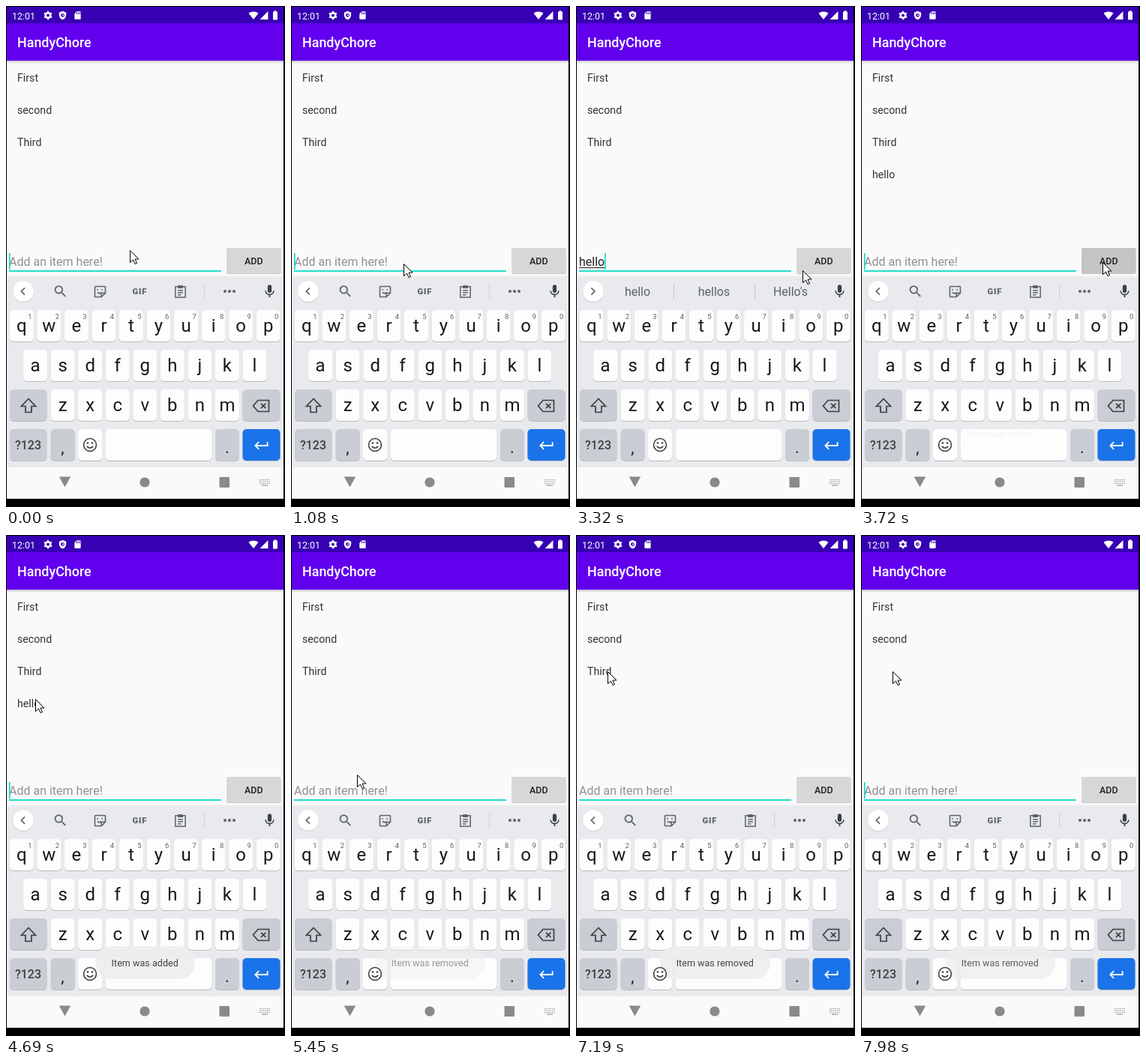
An HTML page with a canvas that plays this animation: 372x669 px, repeating every 8000 ms.

```html
<!DOCTYPE html>
<html lang="en">
<head>
<meta charset="utf-8">
<title>To-do list</title>
<style>
html, body { margin: 0; width: 100%; height: 100%; overflow: hidden; background: #000; }
canvas { display: block; }
</style>
</head>
<body>
<canvas id="stage" width="372" height="669"></canvas>
<script>
const c = document.getElementById('stage').getContext('2d');
const LOOP = 8000;
const INK = '#3c4043', GREY = '#5f6368', TEAL = '#03dac5';

// Times in ms: [start, x, y]
const pointer = [
  [0, 165, 326], [410, 160, 332], [545, 154, 339], [680, 150, 344],
  [3320, 302, 353], [3440, 322, 342], [3850, 300, 328], [3980, 190, 272],
  [4120, 82, 232], [4260, 39, 219], [5430, 88, 320], [5580, 160, 470],
  [5720, 224, 587], [5840, 262, 608], [5960, 235, 616], [6110, 226, 560],
  [6250, 190, 440], [6390, 145, 320], [6530, 108, 230], [6670, 88, 180],
  [6800, 75, 160], [6920, 62, 168], [7060, 48, 177], [7190, 42, 182]
];
const typed = [
  [0, ''], [1360, 'h'], [1910, 'he'], [2520, 'hel'], [2680, 'hell'],
  [2860, 'hello'], [3560, '']
];
const hints = [
  [0, null], [1510, ['h', 'he', 'how']], [2060, ['he', 'hello', 'hey']],
  [2680, ['hell', 'hello', 'help']], [3010, ['hello', 'hellos', "Hello's"]], [3700, null]
];
const lists = [
  [0, ['First', 'second', 'Third']],
  [3560, ['First', 'second', 'Third', 'hello']],
  [5310, ['First', 'second', 'Third']],
  [7700, ['First', 'second']]
];
const at = (track, t) => track.filter(k => k[0] <= t).pop();
const ramp = (t, a, b) => Math.min(1, Math.max(0, (t - a) / (b - a)));

function box(x, y, w, h, fill, r = 0) {
  c.fillStyle = fill;
  c.beginPath();
  c.roundRect(x, y, w, h, r);
  c.fill();
}

function dot(x, y, r, fill) {
  c.fillStyle = fill;
  c.beginPath();
  c.arc(x, y, r, 0, 7);
  c.fill();
}

function text(s, x, y, size, color, align = 'left', weight = 400) {
  c.font = `${weight} ${size}px Roboto, sans-serif`;
  c.textAlign = align;
  c.fillStyle = color;
  c.fillText(s, x, y);
}

// Path on a 24-unit grid centred on (x, y); a line width means stroke
function icon(d, x, y, size, color, line) {
  const k = size / 24;
  c.save();
  c.translate(x, y);
  c.scale(k, k);
  c.translate(-12, -12);
  c.fillStyle = c.strokeStyle = color;
  c.lineWidth = line / k;
  line ? c.stroke(new Path2D(d)) : c.fill(new Path2D(d));
  c.restore();
}

function key(x, y, w, fill) {
  box(x, y + 1, w, 42, '#b9bbc0', 5);
  box(x, y, w, 42, fill, 5);
}

function letters(row, x, y) {
  [...row].forEach((ch, i) => {
    const mid = x + 36.55 * i;
    key(mid - 15.7, y, 32, '#fdfdfd');
    text(ch, mid + .3, y + 29, 24, '#17181a', 'center');
  });
}

function statusBar() {
  box(1, 1, 369, 22, '#3700b3');
  text('12:01', 8, 17.5, 12.5, '#fff');
  c.strokeStyle = '#fff';
  c.lineWidth = 2.6;
  c.beginPath();
  c.arc(56, 12.5, 3.3, 0, 7);
  c.stroke();
  c.lineWidth = 2;
  for (let i = 0; i < 6; i++) {
    const a = i * Math.PI / 3 + .5, dx = Math.cos(a), dy = Math.sin(a);
    c.beginPath();
    c.moveTo(56 + dx * 4, 12.5 + dy * 4);
    c.lineTo(56 + dx * 5.8, 12.5 + dy * 5.8);
    c.stroke();
  }
  icon('M12 1 3 5v6c0 5.5 3.8 10.7 9 12 5.2-1.3 9-6.5 9-12V5z', 75.5, 12.5, 12.5, '#fff');
  dot(75.5, 12.3, 2.4, '#3700b3');
  dot(76, 12.3, 1, '#fff');
  icon('M18 2h-8L4 8v12a2 2 0 0 0 2 2h12a2 2 0 0 0 2-2V4a2 2 0 0 0-2-2z', 95.5, 12.5, 12.5, '#fff');
  for (let i = 0; i < 3; i++) box(94 + i * 2, 8.5, 1, 2.4, '#3700b3');
  icon('M12 21 0 6C7 .5 17 .5 24 6z', 330, 13, 13, '#fff');
  icon('M2 22h20V2z', 344, 12.5, 13, '#fff');
  box(356, 7.5, 6, 11, '#fff', 1);
  box(357.5, 6.3, 3, 2, '#fff');
}

function content(t) {
  box(1, 23, 369, 339, '#fafafa');
  box(1, 23, 369, 50, '#6200ee');
  const shade = c.createLinearGradient(0, 73, 0, 77);
  shade.addColorStop(0, '#c8c8cb');
  shade.addColorStop(1, '#fafafa');
  box(1, 73, 369, 4, shade);
  text('HandyChore', 15, 55, 17.9, '#fff', 'left', 500);
  at(lists, t)[1].forEach((s, i) => text(s, 15, 101 + 43 * i, 14.2, '#333'));

  const value = at(typed, t)[1];
  text(value || 'Add an item here!', 4, 347, 16, value ? '#212121' : '#919191');
  const w = value ? c.measureText(value).width : 0;
  if (value) box(4, 349, w, 1, '#212121');
  box(4, 353, 283, 1.7, TEAL);
  const caret = t < 1080 ? t < 560 : t < 4180 || (t - 3690) % 1000 < 500;
  if (caret) box(4 + w, 330, 1.6, 22, TEAL);

  const pressed = t >= 3560 && t < 3850;
  box(294, 324, 72.5, 34, '#c9c9c9', 2);
  box(294, 323, 72.5, 34, pressed ? '#c4c5c5' : '#d6d7d7', 2);
  text('ADD', 330.3, 344.8, 12.5, '#222', 'center', 500);
}

function strip(words) {
  dot(23, 382, 14, '#d2d4d7');
  dot(23, 381, 13.7, '#fff');
  icon(words ? 'M8 5l7 7-7 7' : 'M15 5l-7 7 7 7', 23, 381, 16, GREY, 1.7);
  icon('M12 14a3 3 0 0 0 3-3V5a3 3 0 0 0-6 0v6a3 3 0 0 0 3 3zM17.3 11c0 3-2.54 5.1-5.3 5.1' +
    'S6.7 14 6.7 11H5c0 3.41 2.72 6.23 6 6.72V21h2v-3.28c3.28-.48 6-3.3 6-6.72z', 351.5, 381, 21, INK);
  if (words) {
    words.forEach((s, i) => text(s, 82 + 102 * i, 387, 16, GREY, 'center'));
    box(130, 371, 1, 20, '#c4c6ca');
    box(238, 371, 1, 20, '#c4c6ca');
    return;
  }
  icon('M15.5 14h-.79l-.28-.27A6.47 6.47 0 0 0 16 9.5 6.5 6.5 0 1 0 9.5 16c1.61 0 3.09-.59 ' +
    '4.23-1.57l.27.28v.79l5 4.99L20.49 19l-4.99-5zm-6 0C7.01 14 5 11.99 5 9.5S7.01 5 9.5 5 ' +
    '14 7.01 14 9.5 11.99 14 9.5 14z', 72.5, 381, 21, GREY);
  icon('M5 4h14a1 1 0 0 1 1 1v9l-6 6H5a1 1 0 0 1-1-1V5a1 1 0 0 1 1-1zM20 14h-6v6M8 13q3 3 6 0M8 8v2M15 8v2',
    125.5, 381.5, 21, GREY, 1.6);
  c.letterSpacing = '.8px';
  text('GIF', 178.3, 385, 11.3, GREY, 'center', 900);
  c.letterSpacing = '0px';
  icon('M4 4h16v17H4zM8 10h8M8 13.5h8M8 17h5', 232.5, 381.5, 20, GREY, 1.5);
  box(229, 373, 7, 4, GREY, 1);
  box(264, 371, 1, 20, '#d0d2d6');
  for (let i = 0; i < 3; i++) dot(292 + 6 * i, 381, 2, GREY);
}

function keyboard(t) {
  box(1, 362, 369, 254, '#e8eaed');
  box(1, 360, 369, 2, '#eff0f2');
  strip(at(hints, t)[1]);
  letters('qwertyuiop', 20.5, 406);
  for (let i = 0; i < 10; i++)
    text((i + 1) % 10, 31.8 + 36.55 * i, 417.5, 9.5, GREY, 'center');
  letters('asdfghjkl', 38.8, 459);
  letters('zxcvbnm', 75.3, 512);
  const side = '#cacdd4';
  key(5, 512, 49.5, side);
  key(315.5, 512, 50, side);
  key(5, 565, 49.5, side);
  key(59.7, 565, 32, side);
  key(96, 565, 32, '#fdfdfd');
  key(133, 565, 141, '#fdfdfd');
  key(279, 565, 32, side);
  key(315.5, 565, 50, '#1a73e8');
  icon('M12 3 2.5 13H8v8h8v-8h5.5z', 30, 533.5, 24, INK, 1.7);
  icon('M8 4.5h14.5v15H8L1.5 12zM12 8.8l6.4 6.4M18.400 8.800l-6.400 6.400', 340, 534, 24, INK, 1.7);
  icon('M20.500 7v5H4M8.500 7l-5 5 5 5', 340.500, 587, 23, '#fff', 1.800);
  text('?123', 29.500, 592, 16, INK, 'center', 500);
  text(',', 75.500, 597, 22, '#222', 'center');
  text('.', 295, 597, 22, '#222', 'center');
}

function navBar() {
  box(1, 616, 369, 42, '#fafafa');
  icon('M0 1h24L12 23z', 78.500, 635.500, 15.500, '#8a8a8a');
  dot(185, 636, 6.600, '#8a8a8a');
  box(284.500, 629, 13.500, 14, '#8a8a8a', 1);
  for (let i = 0; i < 6; i++)
    for (let j = 0; j < 3; j++) box(338 + i * 2.500, 632 + j * 2.500, 1.300, 1.300, '#999');
  box(341, 639.500, 8, 1.200, '#999');
}

function toast(t) {
  const added = t < 5310;
  const alpha = t < 3700 ? 0
    : added ? ramp(t, 3700, 4120)
    : t < 7560 ? ramp(t, 5310, 5580)
    : t < 7700 ? 1 - .6 * ramp(t, 7560, 7700)
    : .4 + .45 * ramp(t, 7700, 7980);
  const w = added ? 132 : 147;
  c.globalAlpha = alpha * .9;
  box(185.500 - w / 2, 549, w, 44, '#eeeeef', 21);
  c.globalAlpha = alpha;
  text(added ? 'Item was added' : 'Item was removed', 185.200, 576, 12.600, '#444', 'center');
  c.globalAlpha = 1;
}

function smiley() {
  icon('M21 12a9 9 0 1 1-18 0 9 9 0 0 1 18 0zM7.500 14q4.500 5 9 0', 112, 586, 22.500, INK, 1.600);
  dot(109, 583.500, 1.300, INK);
  dot(115, 583.500, 1.300, INK);
}

function arrow(x, y) {
  c.save();
  c.translate(x + .5, y + .5);
  const p = new Path2D('M0 0V16L4 12.500 6.500 18 9 17 6.500 11.500H11.500z');
  c.fillStyle = '#fff';
  c.strokeStyle = '#000';
  c.lineWidth = 1;
  c.fill(p);
  c.stroke(p);
  c.restore();
}

function draw(now) {
  const t = now % LOOP;
  c.fillStyle = '#000';
  c.fillRect(0, 0, 372, 669);
  statusBar();
  content(t);
  keyboard(t);
  navBar();
  toast(t);
  smiley();
  const [, x, y] = at(pointer, t);
  arrow(x, y);
  requestAnimationFrame(draw);
}
requestAnimationFrame(draw);
</script>
</body>
</html>
```
